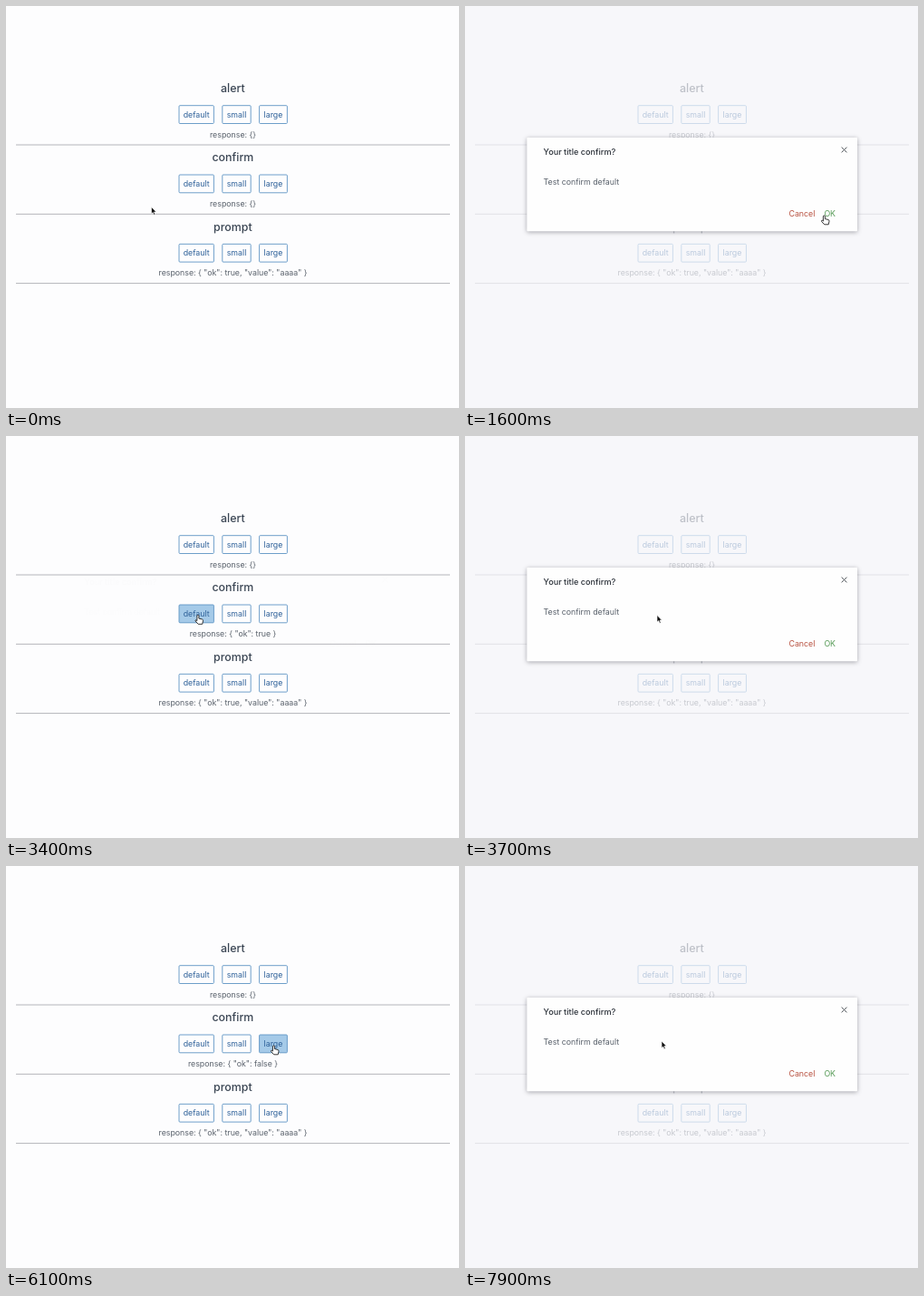
Write an HTML page that moves like this. It is 500 px wide and 443 px high and loops after 8000 ms.

```html
<!DOCTYPE html>
<html lang="en">
<head>
<meta charset="utf-8">
<title>Dialog demo</title>
<style>
  html, body { margin: 0; width: 100%; height: 100%; overflow: hidden; background: #fdfdfe; }
  svg { display: block; width: 100%; height: 100%; }
  text { font: 400 8.8px Inter, Roboto, sans-serif; fill: #59616b; }
  .mid { text-anchor: middle; }
  .head { font-size: 12.4px; font-weight: 500; fill: #3b4654; }
  .label { fill: #2d6099; }
  .rule { stroke: #b4b5ba; }
  .button { stroke: #5e95c5; stroke-width: .9; fill: #a5cae8; }
  .panel { fill: #fefefe; filter: drop-shadow(0 1.5px 2.5px rgba(40, 40, 50, .4)); }
  .title { font-size: 9.15px; font-weight: 500; fill: #2c323a; }
  .cancel { fill: #b8503f; }
  .ok { fill: #579b57; }
  .close { stroke: #454a50; stroke-width: .9; }
  .arrow { fill: #111; stroke: #fff; stroke-width: .6; }
  .hand { fill: #fff; stroke: #222; stroke-width: .9; stroke-linejoin: round; }
  .beam { fill: none; stroke: #333; stroke-width: .9; }
</style>
</head>
<body>
<svg viewBox="0 0 500 443" preserveAspectRatio="none">
  <g id="page"></g>
  <g id="modal">
    <rect width="500" height="443" fill="#f6f5fa" opacity=".7"/>
    <rect class="panel" x="68.3" y="145" width="364.7" height="103.2" rx="1"/>
    <text class="title" x="86.6" y="164.3">Your title confirm?</text>
    <text x="86.6" y="197">Test confirm default</text>
    <text class="cancel" x="357.5" y="231.9">Cancel</text>
    <text class="ok" x="396.4" y="232.1">OK</text>
    <path class="close" d="M415.6 155.6l5.8 5.8m0-5.8l-5.8 5.8"/>
  </g>
  <g id="cursor">
    <path class="arrow" d="M0 0V7.6L1.7 6L2.9 8.8L4.2 8.2L3 5.5H5.3Z"/>
    <path class="hand" d="M-1.1 .9C-1.1-.5 .9-.5 .9 .9V3.6L4.6 4.5Q5.7 4.9 5.5 6.2L4.7 9.8H.2L-2.9 6.5Q-3.3 5.2-2.2 5.2L-1.1 6.1Z"/>
    <path class="beam" d="M-1.8-4.4Q0-4.4 0-3.2Q0-4.4 1.8-4.4M0-3.2V3.2M-1.8 4.4Q0 4.4 0 3.2Q0 4.4 1.8 4.4M-1.1 1.2H1.1"/>
  </g>
</svg>
<script>
const LOOP = 8000;
const PITCH = 76.3;
const FADE = 180;

// Dialog visits: [opens at, closes at]
const VISITS = [[520, 1900], [3400, 4420], [7470, LOOP + FADE]];

// Pointer stops: [time, x, y]
const STOPS = [
  [0, 160.5, 221.5], [400, 204, 196], [1000, 204, 196], [1550, 396.5, 231],
  [2550, 396.5, 231], [2900, 267.5, 215], [3200, 212, 197.5], [3850, 212, 197.5],
  [4300, 373, 231], [4900, 373, 231], [5400, 350, 226], [6000, 296, 198],
  [6400, 293, 198], [6750, 253, 198], [7100, 251.5, 197], [7300, 217, 193], [LOOP, 217, 193]
];

const BUTTONS = [["default", 191, 38.4], ["small", 238.8, 31.4], ["large", 279.6, 30.8]];
const ROWS = ["alert", "confirm", "prompt"];
const byId = id => document.getElementById(id);
const page = byId("page"), modal = byId("modal"), cursor = byId("cursor");

function add(tag, attrs, text = "") {
  const node = document.createElementNS("http://www.w3.org/2000/svg", tag);
  for (const key in attrs) node.setAttribute(key, attrs[key]);
  node.textContent = text;
  return page.appendChild(node);
}

const fills = [], replies = [];
ROWS.forEach((name, row) => {
  const y = row * PITCH;
  add("text", { class: "mid head", x: 250.4, y: y + 94.9 }, name);
  for (const [label, x, width] of BUTTONS) {
    const box = add("rect", { class: "button", x, y: y + 109.7, width, height: 19.8, rx: 1, "fill-opacity": 0 });
    if (row === 1) fills.push(box);
    add("text", { class: "mid label", x: x + width / 2, y: y + 122.8 }, label);
  }
  replies.push(add("text", { class: "mid", x: 250.5, y: y + 144.7 }, "response: {}"));
  add("path", { class: "rule", d: `M11 ${y + 153}H490` });
});
replies[2].textContent = 'response: { "ok": true, "value": "aaaa" }';

const clamp = v => Math.max(0, Math.min(1, v));
const inside = (p, x, y, w, h) => p.x >= x && p.x <= x + w && p.y >= y && p.y <= y + h;

function pointer(t) {
  const i = Math.max(1, STOPS.findIndex(s => s[0] >= t));
  const [t0, x0, y0] = STOPS[i - 1], [t1, x1, y1] = STOPS[i];
  const u = clamp((t - t0) / (t1 - t0)), k = u * u * (3 - 2 * u);
  return { x: x0 + (x1 - x0) * k, y: y0 + (y1 - y0) * k };
}

function shown(t) {
  return Math.max(...VISITS.map(([a, b]) => Math.min(clamp((t - a) / FADE), clamp((b + FADE - t) / FADE))));
}

// Index of the hovered confirm button; the clicked one holds while the dialog is up
function hovered(t) {
  if (t < 0) return -1;
  if (shown(t) > 0) return 0;
  const p = pointer(t);
  return BUTTONS.findIndex(([, x, w]) => inside(p, x, 186, w, 19.8));
}

function tint(t, index) {
  let sum = 0;
  for (let k = 0; k < 10; k++) sum += hovered(t - k * 25) === index;
  return sum / 10;
}

function shape(t, p) {
  if (shown(t) > .5) {
    return inside(p, 356, 222, 32, 14) || inside(p, 392, 222, 20, 14) ? 1 : 0;
  }
  if (hovered(t) >= 0) return 1;
  return inside(p, 203, 211, 96, 11) ? 2 : 0;
}

function draw(t) {
  const p = pointer(t), kind = shape(t, p);
  modal.setAttribute("opacity", shown(t));
  fills.forEach((box, i) => box.setAttribute("fill-opacity", tint(t, i)));
  replies[1].textContent = "response: " + (t < 1900 ? "{}" : t < 4420 ? '{ "ok": true }' : '{ "ok": false }');
  cursor.setAttribute("transform", `translate(${p.x} ${p.y})`);
  [...cursor.children].forEach((part, i) => part.setAttribute("visibility", i === kind ? "visible" : "hidden"));
}

const start = performance.now();
function tick() {
  draw((performance.now() - start) % LOOP);
  requestAnimationFrame(tick);
}
tick();
</script>
</body>
</html>
```
